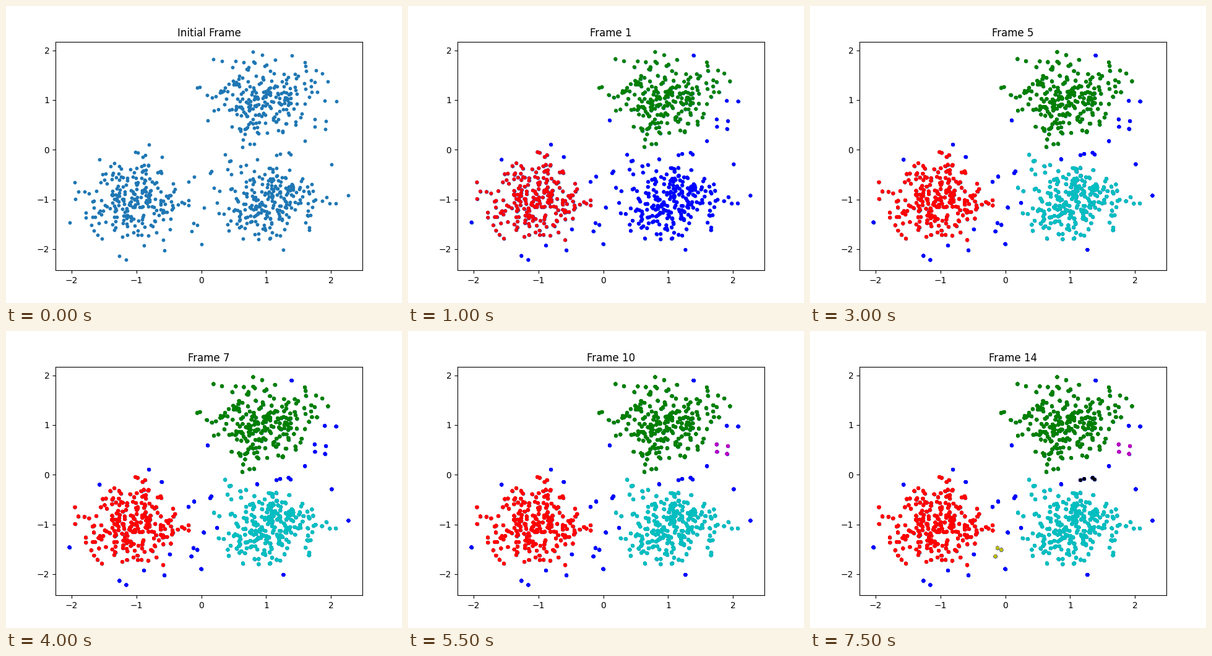
Write a matplotlib script that moves like this. It is 640x480 px and loops after 8 s.

```python
import numpy as np
import matplotlib.pyplot as plt
from matplotlib.animation import FuncAnimation

EPS, MIN_PTS = 0.2, 3
STEPS = 15
PALETTE = np.array(list("bgrcmyk"))

# Three shuffled Gaussian blobs
rng = np.random.RandomState(0)
centers = [(1, 1), (-1, -1), (1, -1)]
points = np.concatenate([rng.normal(c, 0.4, (250, 2)) for c in centers])
order = np.arange(len(points))
rng.shuffle(order)
points = points[order]

dist = np.hypot(*(points[:, None] - points[None]).transpose(2, 0, 1))
near = [np.flatnonzero(row <= EPS) for row in dist]


def dbscan_steps():
    """Yield the labels after each unvisited point; 0 means noise or unseen."""
    labels = np.zeros(len(points), int)
    visited = np.zeros(len(points), bool)
    cluster = 0
    for start in range(len(points)):
        if visited[start]:
            continue
        visited[start] = True
        if len(near[start]) >= MIN_PTS:
            cluster += 1
            labels[start] = cluster
            queue = list(near[start])
            while queue:
                p = queue.pop()
                if labels[p] == 0:
                    labels[p] = cluster
                if not visited[p]:
                    visited[p] = True
                    if len(near[p]) >= MIN_PTS:
                        queue.extend(near[p])
        yield labels.copy()


fig, ax = plt.subplots(figsize=(6.4, 4.8), dpi=100)
title = ax.set_title("Initial Frame")

# Every step paints over the ones before it
layers = [ax.scatter(*points.T, s=10)]
for _, labels in zip(range(STEPS), dbscan_steps()):
    layers.append(ax.scatter(*points.T, s=10, c=PALETTE[labels % len(PALETTE)]))


def update(i):
    for k, layer in enumerate(layers):
        layer.set_visible(k <= i)
    title.set_text(f"Frame {i - 1}" if i else "Initial Frame")
    return [*layers, title]


anim = FuncAnimation(fig, update, frames=STEPS + 1, interval=500,
                     repeat=True, repeat_delay=0, blit=False)
plt.show()
```
